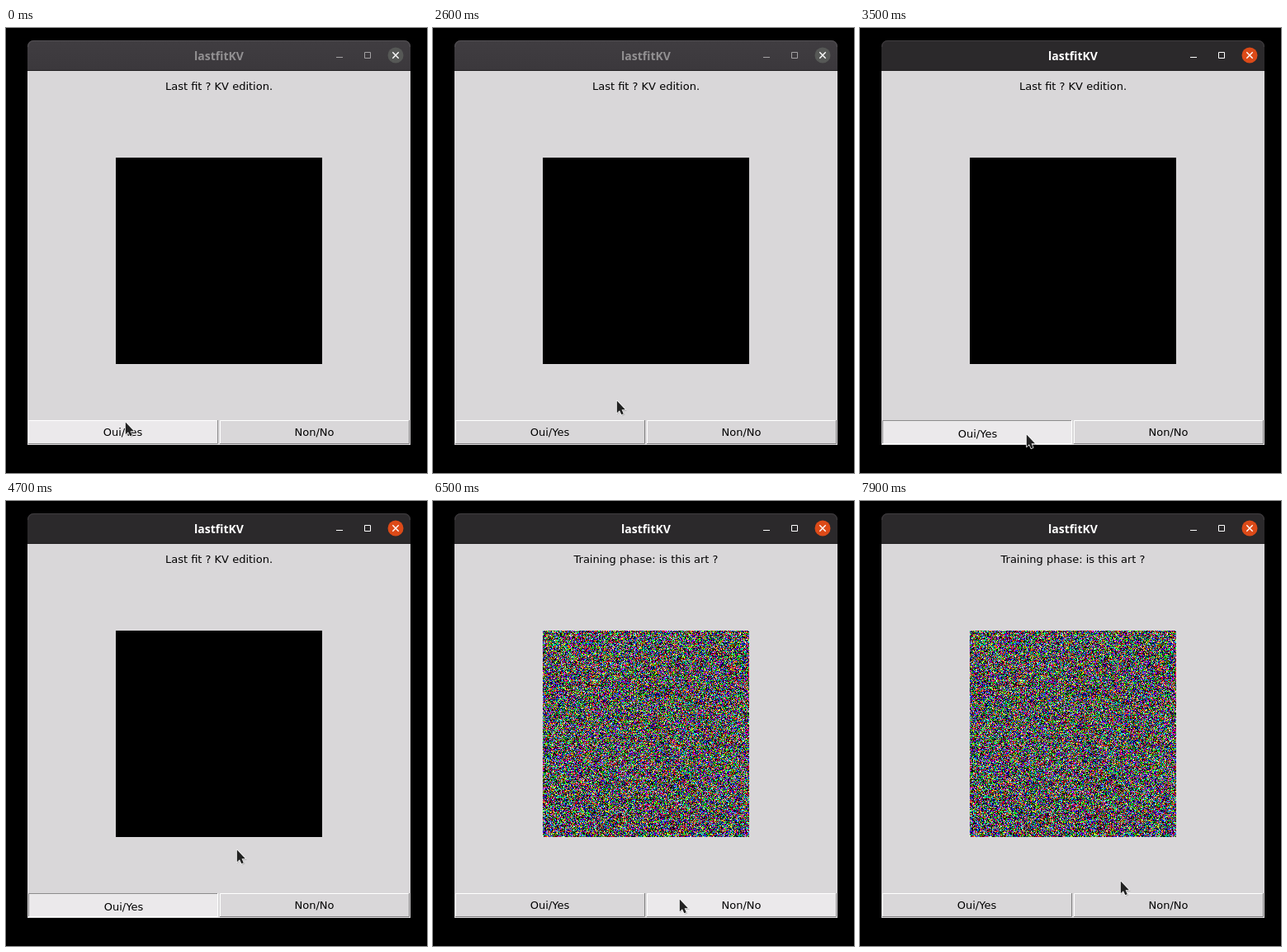
An HTML page with a canvas for the animation above (8 s loop, 510x539 px).

```html
<!DOCTYPE html>
<html lang="en">
<head>
<meta charset="utf-8">
<title>Art trainer</title>
<style>
html, body { margin: 0; width: 100%; height: 100%; overflow: hidden; background: #000; }
svg, canvas { position: absolute; left: 0; top: 0; }
canvas { left: 133px; top: 157px; background: #000; }
text { font: 13px "DejaVu Sans", sans-serif; text-anchor: middle; }
#name { font: bold 14px "Noto Sans", sans-serif; fill: #929092; }
#bar { fill: url(#dim); }
#edge { stroke: #555256; }
#tools { stroke: #a3a1a3; fill: none; }
#close { fill: #565856; }
.active #name { fill: #fff; }
.active #bar { fill: #2b292b; }
.active #edge { stroke: #413e41; }
.active #tools { stroke: #fff; }
.active #close { fill: #dc4a18; }
.button { --face: #d9d7d9; --light: #fff; --dark: #828182; }
.button rect { fill: var(--face); }
.button .tl { stroke: var(--light); fill: none; }
.button .br { stroke: var(--dark); fill: none; }
.hover { --face: #ebe9eb; --dark: #8d8c8d; }
.pressed { --light: #8d8c8d; --dark: #fff; }
.pressed text { transform: translate(1px, 2px); }
</style>
</head>
<body>
<svg id="stage" width="510" height="539">
  <defs>
    <linearGradient id="dim" x2="0" y2="1">
      <stop stop-color="#403d41"/><stop offset="1" stop-color="#3b383c"/>
    </linearGradient>
  </defs>
  <path id="bar" d="M26 52V23Q26 15 34 15H482Q490 15 490 23V52Z"/>
  <path id="edge" fill="none" d="M26.5 23Q27 15.5 34 15.5H482Q489 15.5 489.5 23"/>
  <path stroke="#232123" d="M26 51.5H490"/>
  <text id="name" x="258" y="39">lastfitKV</text>
  <path id="tools" d="M400 35.5H408M434.5 29.5H441.5V36.5H434.5Z"/>
  <circle id="close" cx="472" cy="33" r="9.5"/>
  <path stroke="#fff" stroke-width="1.4" d="M468.3 29.3L475.7 36.7M475.7 29.3L468.3 36.7"/>
  <rect x="26" y="52" width="464" height="453" fill="#d9d7d9"/>
  <text id="label" x="258" y="75"></text>
  <g id="buttons"></g>
  <g id="arrow" stroke-linejoin="round">
    <path d="M1 2V18L5 15L7 20L10.5 18.5L8.5 14H13Z" fill="#000" opacity=".16"/>
    <path d="M.8 1.4V16.2L4 13.2L6.3 18.3L8.8 17.2L6.6 12.2H11Z" fill="#222" stroke="#fff" stroke-width="1.4" paint-order="stroke"/>
  </g>
  <path id="resize" d="M0 -10.5L4 -3.5H-4ZM0 10L4 2.5H-4Z" fill="#000" stroke="#fff" stroke-width="1.2"/>
</svg>
<canvas id="art" width="250" height="250"></canvas>
<script>
const LOOP = 8000, PRESS = 3500, TRAIN = 5600;
const YES = 0, NO = 1, NONE = -1;
const $ = id => document.getElementById(id);

// time, x, y, hovered button, resize pointer
const pointer = [
  [0, 144, 476, YES],
  [1300, 144, 476, NONE],
  [1400, 198, 438, NONE],
  [2600, 222, 450, NONE],
  [2700, 285, 476, NO],
  [2800, 335, 491, NO],
  [2900, 357, 505, NONE, true],
  [3100, 351, 505, NONE, true],
  [3200, 244, 495, YES],
  [3300, 201, 491, YES],
  [4100, 225, 467, YES],
  [4200, 256, 436, YES],
  [4300, 273, 419, YES],
  [4700, 279, 421, YES],
  [TRAIN, 279, 421, NONE],
  [6500, 298, 481, NO],
  [6600, 301, 450, NONE],
  [7000, 326, 502, NONE, true],
  [7600, 329, 506, NO],
  [7800, 321, 480, NO],
  [7900, 315, 459, NONE]
];

$("buttons").innerHTML = ["Oui/Yes", "Non/No"].map((word, i) => `
  <g class="button" transform="translate(${27 + 232 * i} 475)">
    <rect width="230" height="29"/>
    <path class="br" d="M0 28.5H229.5V0"/>
    <path class="tl" d="M.5 28V.5H229"/>
    <text x="114.5" y="19">${word}</text>
  </g>`).join("");
const buttons = [...$("buttons").children];

const brush = $("art").getContext("2d");
const noise = brush.createImageData(250, 250);
let seed = 7;
const random = () => (seed = (Math.imul(seed, 1664525) + 1013904223) >>> 0) / 2 ** 32;
for (let i = 0; i < noise.data.length; i++) {
  noise.data[i] = i % 4 === 3 ? 255 : (random() * 2 - 1) * 400;
}

let trained = null;
function showArt(on) {
  if (on === trained) return;
  trained = on;
  $("label").textContent = on ? "Training phase: is this art ?" : "Last fit ? KV edition.";
  if (on) brush.putImageData(noise, 0, 0);
  else brush.clearRect(0, 0, 250, 250);
}

function draw(now) {
  const t = now % LOOP;
  const [, x, y, hovered, resizing] = pointer.findLast(step => step[0] <= t);
  showArt(t >= TRAIN);
  $("stage").classList.toggle("active", t >= PRESS);
  buttons.forEach((button, i) => {
    button.classList.toggle("hover", i === hovered);
    button.classList.toggle("pressed", i === YES && t >= PRESS && t < TRAIN);
  });
  for (const id of ["arrow", "resize"]) {
    $(id).setAttribute("transform", `translate(${x} ${y})`);
    $(id).style.display = (id === "resize") === !!resizing ? "" : "none";
  }
}

const start = performance.now();
function tick() {
  draw(performance.now() - start);
  requestAnimationFrame(tick);
}
tick();
</script>
</body>
</html>
```
